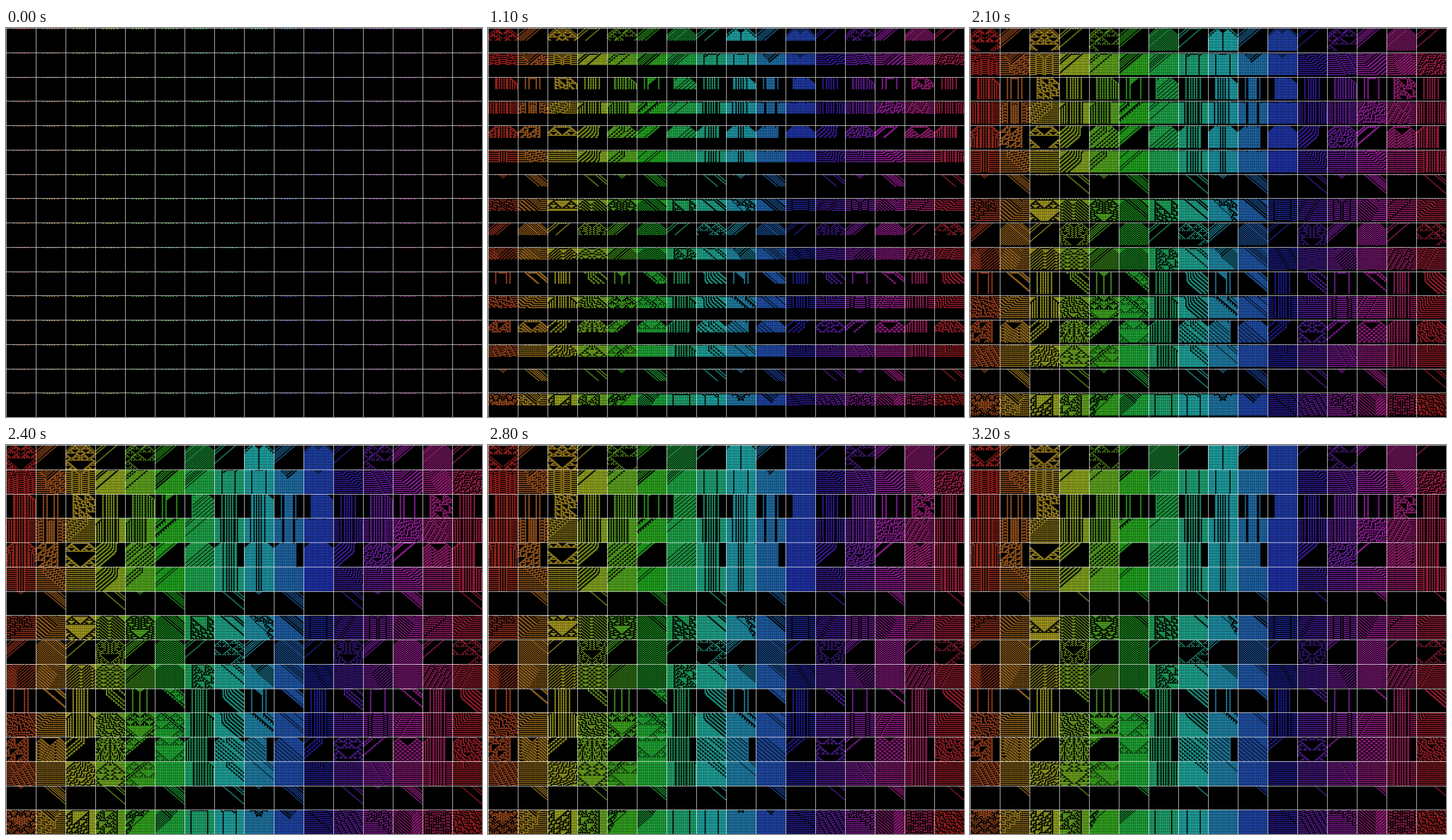
An HTML page with a canvas for the animation above (3300 ms loop, 640x524 px).

```html
<!DOCTYPE html>
<html lang="en">
<head>
<meta charset="utf-8">
<title>Elementary cellular automata</title>
<style>
  html, body { margin: 0; width: 100%; height: 100%; overflow: hidden; background: #000; }
  canvas { display: block; width: 640px; height: 524px; }
</style>
</head>
<body>
<canvas id="stage" width="640" height="524"></canvas>
<script>
const ctx = document.getElementById('stage').getContext('2d');
const WIDTH = 640, HEIGHT = 524, GRID = 16;
const PANEL_W = WIDTH / GRID, PANEL_H = HEIGHT / GRID;
const COLS = 25, ROWS = 24;
const CELL_W = PANEL_W / COLS, CELL_H = PANEL_H / ROWS;
const STEPS = 33, STEP_MS = 100, FIRST_RULE = 90;
const TOP_INSET = 0.6;
const SEED = '1001010101001';

// The lattice is wide enough that its ends never reach the visible window.
const PAD = STEPS + 2;
const LATTICE = COLS + 2 * PAD;

function evolve(rule) {
  let row = new Uint8Array(LATTICE);
  const start = (LATTICE - SEED.length) / 2;
  [...SEED].forEach((bit, i) => { row[start + i] = +bit; });

  const history = [row];
  while (history.length < STEPS) {
    const next = new Uint8Array(LATTICE);
    for (let i = 0; i < LATTICE; i++) {
      const left = row[Math.max(i - 1, 0)];
      const right = row[Math.min(i + 1, LATTICE - 1)];
      next[i] = rule >> (left * 4 + row[i] * 2 + right) & 1;
    }
    history.push(row = next);
  }
  return history;
}

const panels = Array.from({ length: GRID * GRID }, (_, i) => ({
  x: Math.floor(i / GRID) * PANEL_W,
  y: (i % GRID) * PANEL_H,
  color: `hsl(${i * 360 / 256}, 68%, 40%)`,
  history: evolve((i + FIRST_RULE) % 256)
}));

function drawPanel({ x, y, color, history }, step) {
  const first = Math.max(0, step - ROWS + 1);
  ctx.fillStyle = color;
  for (let s = first; s <= step; s++) {
    const cellY = y + TOP_INSET + (s - first) * CELL_H;
    for (let c = 0; c < COLS; c++) {
      if (history[s][PAD + c]) ctx.fillRect(x + c * CELL_W, cellY, CELL_W, CELL_H);
    }
  }
}

function drawGrid() {
  ctx.fillStyle = 'rgba(255, 255, 255, 0.6)';
  for (let i = 0; i < GRID; i++) {
    ctx.fillRect(i * PANEL_W, 0, 1, HEIGHT);
    ctx.fillRect(0, Math.round(i * PANEL_H), WIDTH, 1);
  }
}

function draw(step) {
  ctx.fillStyle = '#000';
  ctx.fillRect(0, 0, WIDTH, HEIGHT);
  panels.forEach(panel => drawPanel(panel, step));
  drawGrid();
}

const startTime = performance.now();
let shown = 0;

function tick() {
  const elapsed = performance.now() - startTime;
  const step = Math.floor(elapsed / STEP_MS) % STEPS;
  if (step !== shown) draw(shown = step);
  requestAnimationFrame(tick);
}

draw(0);
requestAnimationFrame(tick);
</script>
</body>
</html>
```
